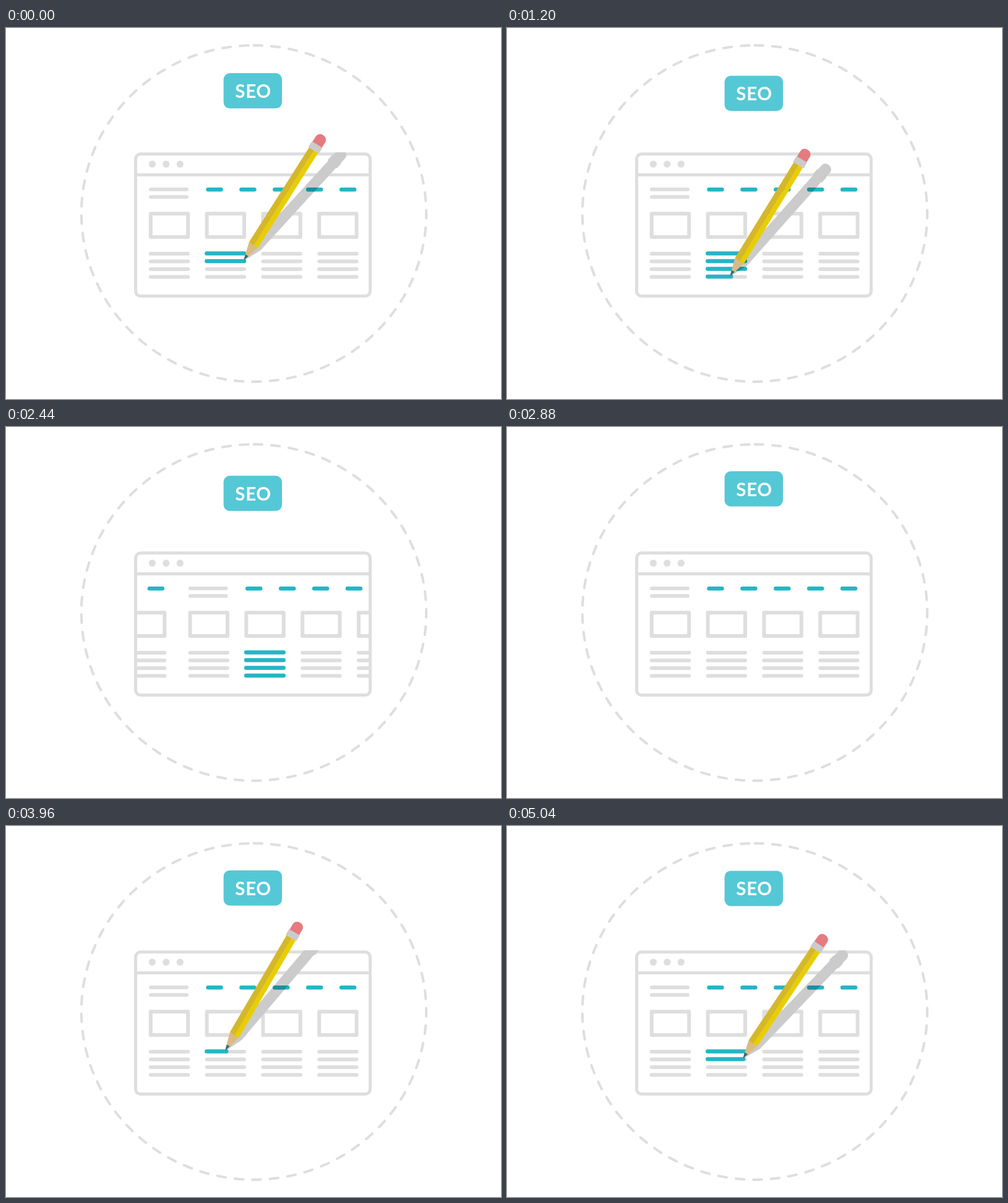
Animation, 800 px wide and 600 px high, one loop 5080 ms. Source, as an HTML page:

```html
<!DOCTYPE html>
<html lang="en">
<head>
<meta charset="utf-8">
<title>Pencil writing on a web page</title>
<style>
  html, body { margin: 0; width: 100%; height: 100%; overflow: hidden; background: #fff; }
  svg { display: block; width: 100vw; height: 100vh; }
  text { font: 700 29.5px Lato, "Open Sans", sans-serif; letter-spacing: .7px; }
</style>
</head>
<body>
<svg viewBox="0 0 800 600" xmlns="http://www.w3.org/2000/svg">
  <defs>
    <clipPath id="disc"><ellipse cx="400.5" cy="300" rx="280" ry="273"/></clipPath>
    <clipPath id="frame"><rect x="207" y="201" width="384" height="235" rx="9"/></clipPath>
    <clipPath id="inside"><rect x="212" y="240" width="374" height="191"/></clipPath>
    <clipPath id="inShade"><path class="shade"/></clipPath>
  </defs>

  <path d="M400.5 28a278.7 272 0 0 1 0 544a278.7 272 0 0 1 0-544" fill="none" stroke="#dedede"
        stroke-width="4" stroke-linecap="round" stroke-dasharray="13.5 14.95"/>

  <g fill="none" stroke="#dedede" stroke-width="5">
    <rect x="209.5" y="203.8" width="379" height="229.7" rx="8"/>
    <path d="M210 237.5H588"/>
  </g>
  <g fill="#dedede">
    <circle cx="236.4" cy="220.2" r="5.6"/>
    <circle cx="258.8" cy="220.2" r="5.6"/>
    <circle cx="281.3" cy="220.2" r="5.6"/>
  </g>

  <g clip-path="url(#inside)" fill="none" stroke-width="6" stroke-linecap="round" stroke-linejoin="round">
    <g id="gray" stroke="#dedede"></g>
    <g id="next">
      <use href="#gray" id="nextGray"/>
      <use href="#nav" stroke="#26b5c5" stroke-width="6.5"/>
    </g>
  </g>

  <g clip-path="url(#disc)">
    <ellipse id="spot" rx="10.5" ry="4" fill="#ebebeb"/>
    <g clip-path="url(#frame)"><path class="shade" id="band" fill="#cbcbcb"/></g>
  </g>

  <g clip-path="url(#inside)" fill="none" stroke="#26b5c5" stroke-width="6.5" stroke-linecap="round">
    <g id="teal">
      <path id="nav"/>
      <path id="ink"/>
    </g>
  </g>
  <g id="dark" clip-path="url(#inShade)" fill="none" stroke="#16929e" stroke-width="6.5" stroke-linecap="round">
    <use href="#teal"/>
  </g>

  <g clip-path="url(#disc)">
    <g id="pencil">
      <path d="M0 0L30-8.5V8.5Z" fill="#dbbb83"/>
      <path d="M0 0L10-2.9V2.9Z" fill="#2a7277"/>
      <path d="M30-8.5H212V1H29Z" fill="#d5b72a"/>
      <path d="M29 .8H212V8.5H30Z" fill="#e8ce00"/>
      <path d="M221-9H232A8 8 0 0 1 240-1V1A8 8 0 0 1 232 9H221Z" fill="#e57b80"/>
      <rect x="211" y="-10" width="11" height="20" rx="1" fill="#cbcbcb"/>
    </g>
  </g>

  <g id="badge">
    <rect x="351.6" width="94.4" height="57" rx="10" fill="#55c8d5"/>
    <text x="399.6" y="40" text-anchor="middle" fill="#fff">SEO</text>
  </g>
</svg>
<script>
const LOOP = 5080, SLIDE = [2260, 2880], PAGE = 374;
const $ = id => document.getElementById(id);
const set = (el, name, value) => el.setAttribute(name, value);
const move = (id, x, y) => set($(id), 'transform', `translate(${x} ${y})`);
const clamp = v => Math.max(0, Math.min(1, v));

const line = p => p;
const smooth = p => p * p * (3 - 2 * p);
const quadIn = p => p * p;
const quadBoth = p => p < .5 ? 2 * p * p : 1 - 2 * (1 - p) * (1 - p);

// Static page content
const columns = [0, 1, 2, 3].map(i => 233.8 + i * 90.8);
const rows = [0, 1, 2, 3].map(i => 365.1 + i * 12.5);
let page = 'M234 261H292M234 273.2H292';
for (const x of columns) {
  page += `M${x} 300.2h60.4v37.8h-60.4Z`;
  for (const y of rows) page += `M${x} ${y}h60.4`;
}
$('gray').innerHTML = `<path d="${page}"/>`;
set($('nav'), 'd', [0, 1, 2, 3, 4].map(i => `M${326.5 + i * 53.9} 261.2h21`).join(''));

const outline = 'M0 0L30-8.5H211V-10H222V-9H232A8 8 0 0 1 240-1V1A8 8 0 0 1 232 9H222V10H211V8.5H30Z';
const shades = document.querySelectorAll('.shade');
shades.forEach(el => set(el, 'd', outline));

// Each written row: start and end time
const strokes = [[3640, 4250], [4340, 5076], [5170, 5740], [5820, 6556]];

// Pencil: time, tip x, tip y, angle, contact with the page, easing towards this pose
const poses = [
  [3180, 700, 452, 18, 0, line],
  [3380, 575, 440, 22, 0, line],
  [3560, 344, 380, 57.8, 1, smooth],
  [3640, 322, 363.5, 58.5, 1, smooth],
  [4250, 383, 363.5, 60.8, 1, line],
  [4340, 322, 376, 60.7, 1, smooth],
  [5040, 381, 376, 56.2, 1, line],
  [5080, 384, 376, 57.6, 1, line],
  [5170, 321, 388.5, 60.5, 1, smooth],
  [5740, 383, 388.5, 60.5, 1, line],
  [5820, 322, 401.5, 60.8, 1, smooth],
  [6556, 383, 401.5, 57, 1, line],
  [6760, 455, 434, 24, .2, quadIn],
  [7000, 593, 440, 21, 0, line],
  [7200, 710, 448, 16, 0, line]
];

function poseAt(t) {
  const i = poses.findIndex(p => p[0] > t);
  if (i < 1) return null;
  const a = poses[i - 1], b = poses[i];
  const k = b[5]((t - a[0]) / (b[0] - a[0]));
  return [1, 2, 3, 4].map(n => a[n] + (b[n] - a[n]) * k);
}

function drawPencil(t) {
  const pose = poseAt(t);
  for (const id of ['pencil', 'spot', 'band', 'dark']) set($(id), 'display', pose ? 'inline' : 'none');
  if (!pose) return;
  const [x, y, angle, contact] = pose;
  set($('pencil'), 'transform', `translate(${x} ${y}) rotate(${-angle})`);
  shades.forEach(el => set(el, 'transform', `translate(${x + 1} ${y}) rotate(${10 - angle})`));
  set($('band'), 'opacity', contact);
  set($('dark'), 'opacity', contact);
  set($('spot'), 'opacity', 1 - contact);
  move('spot', x - 11, y + 18);
}

function drawInk(t) {
  let d = '';
  strokes.forEach(([from, to], i) => {
    if (t >= from) d += `M324.3 ${rows[i] - .6}h${60.6 * clamp((t - from) / (to - from))}`;
  });
  set($('ink'), 'd', d);
}

function drawSlide(t) {
  const sliding = t > SLIDE[0] && t < SLIDE[1];
  const x = sliding ? PAGE * quadBoth((t - SLIDE[0]) / (SLIDE[1] - SLIDE[0])) : 0;
  move('gray', x, 0);
  move('teal', x, 0);
  // The copy already carries the shift of the page it mirrors
  move('nextGray', -x, 0);
  move('next', x - PAGE, 0);
  set($('next'), 'display', sliding ? 'inline' : 'none');
}

function draw(t) {
  const run = t < SLIDE[1] ? t + LOOP : t;
  drawPencil(run);
  drawInk(run);
  drawSlide(t);
  move('badge', 0, 75.25 - 3.75 * Math.cos(2 * Math.PI * (t + 155) / (LOOP / 5)));
}

const begin = performance.now();
function tick(now) {
  draw(Math.max(0, now - begin) % LOOP);
  requestAnimationFrame(tick);
}
draw(0);
requestAnimationFrame(tick);
</script>
</body>
</html>
```
